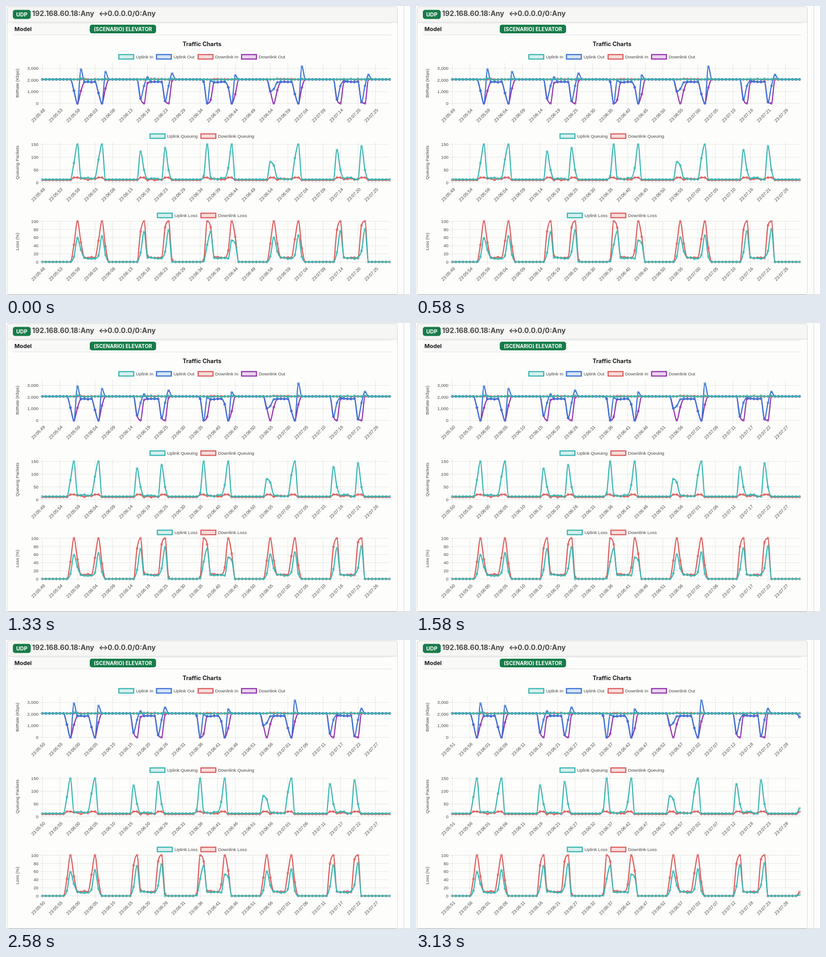
An HTML page for the animation above (3.17 s loop, 883 px wide and 634 px high).

```html
<!DOCTYPE html>
<html lang="en">
<head>
<meta charset="utf-8">
<title>Traffic Charts</title>
<style>
  html, body { margin: 0; width: 100%; height: 100%; overflow: hidden; background: #fdfdfc; }
  svg { display: block; width: 883px; height: 634px; }
  .ui { font-family: Inter, Roboto, sans-serif; font-weight: 700; }
  .chart { font: 9.75px "Liberation Sans", Arial, sans-serif; fill: #484848; }
  .grid { stroke: #000; stroke-opacity: .12; stroke-width: .82; fill: none; }
  .line { fill: none; stroke-width: 2.44; stroke-linejoin: round; }
</style>
</head>
<body>
<svg viewBox="0 0 883 634">
  <path d="M2.5 36V6.5a5 5 0 0 1 5-5H850.5a5 5 0 0 1 5 5V36Z" fill="#f6f6f4"/>
  <rect x="15" y="38" width="165" height="24.5" fill="#f9f9f8"/>
  <g fill="none" stroke="#d5d5d6">
    <rect x="2.5" y="1.5" width="853" height="631" rx="5"/>
    <path d="M3 35.5H855M869.5 0V634"/>
    <path d="M15 63.5H842M15 37.5H842" stroke="#dedee0"/>
    <path d="M0 633.5H883" stroke="#c4c4c4"/>
  </g>
  <g class="ui">
    <rect x="15" y="8.5" width="39" height="20" rx="5" fill="#177c49"/>
    <text x="34.5" y="22.8" font-size="11.6" fill="#fff" text-anchor="middle">UDP</text>
    <g font-size="15.3" fill="#484848">
      <text x="57" y="22">192.168.60.18:Any</text>
      <text x="202.5" y="22">↔</text>
      <text x="222" y="22">0.0.0.0/0:Any</text>
    </g>
    <text x="18.5" y="54.5" font-size="12.4" fill="#1d1d1f">Model</text>
    <rect x="183" y="41" width="145" height="19" rx="5" fill="#177c49"/>
    <text x="255.5" y="54.6" font-size="11.2" fill="#fff" text-anchor="middle">(SCENARIO) ELEVATOR</text>
    <text x="428.5" y="88.4" font-size="12.6" fill="#1d1d1f" text-anchor="middle">Traffic Charts</text>
  </g>
  <g class="chart" id="frame"></g>
  <g class="chart" id="plots"></g>
</svg>
<script>
const LOOP = 3170, SHIFTS = [580, 1580, 2630];
const COUNT = 100, LEFT = 79.5, RIGHT = 838.3, STEP = (RIGHT - LEFT) / (COUNT - 1);
const TEAL = "#37b6b1", BLUE = "#3872d4", RED = "#db5c5b", PURPLE = "#942fae";
const RATE = 2060;

// Each closing door cuts the uplink between two moments (in seconds) and then
// releases a burst. Doors alternate: entering the elevator, leaving it.
const DOORS = [
  { from: 9.53, to: 11, burst: 1070 }, { from: 16.43, to: 18, burst: 640 },
  { from: 28.2, to: 29.27, burst: 380 }, { from: 35.1, to: 36.27, burst: 500 },
  { from: 46.9, to: 48, burst: 100 }, { from: 53.67, to: 55, burst: 340 },
  { from: 65.5, to: 66.4, burst: 0 }, { from: 72.39, to: 74, burst: 1100 },
  { from: 84.16, to: 85.27, burst: 100 }, { from: 91.05, to: 92.27, burst: 390 },
  { from: 102.85, to: 104, burst: 0 },
];

const clamp = v => Math.max(0, Math.min(1, v));

// Share of second i that lies inside a span.
const overlap = (i, from, to) => clamp(Math.min(i + 1, to) - Math.max(i, from));

// Repeatable noise from -1 to 1.
function noise(i, seed) {
  const v = Math.sin(i * 12.9898 + seed * 78.233) * 43758.5453;
  return 2 * (v - Math.floor(v)) - 1;
}

const isRiding = i => DOORS.some((entry, n) => n % 2 === 0 &&
  i >= Math.floor(entry.from) + 2 && i < Math.floor(DOORS[n + 1]?.from));

function measure(i) {
  const riding = isRiding(i) ? 1 : 0;
  const wobble = (seed, size) => riding * size * noise(i, seed);
  const weak = riding * .105 + wobble(1, .02);
  const door = DOORS.find(d => i >= Math.floor(d.from) && i < Math.floor(d.from) + 3);
  let upCut = 0, downCut = 0, burst = 0, downQueue = riding * 3 + wobble(2, 4);
  let upLoss = riding * .095 + wobble(3, .02), downLoss = weak;
  if (door) {
    const phase = i - Math.floor(door.from);
    const share = .95 - door.from % 1;
    upCut = overlap(i, door.from, door.to);
    downCut = overlap(i, door.from, door.from + 1.95);
    downLoss = Math.max(weak, overlap(i, door.from + .05, door.from + 1.95));
    upLoss = Math.max(upLoss, [.3 * share, .4 + .45 * share, .8 - 1.2 * share][phase]);
    if (phase === 2) burst = door.burst;
    else downQueue = 10;
  }
  return {
    upIn: RATE + wobble(4, 60) + (burst > 300 ? 60 : 0),
    downIn: RATE + wobble(5, 45),
    upOut: RATE * (1 - Math.max(upCut, weak)) + burst,
    downOut: RATE * (1 - Math.max(downCut, weak)),
    upQueue: 12.5 + 137.5 * upCut + riding * 3 + wobble(6, 5),
    downQueue: 10 + downQueue,
    upLoss: 100 * upLoss,
    downLoss: 100 * downLoss,
  };
}
const samples = Array.from({ length: COUNT + SHIFTS.length }, (_, i) => measure(i));

const charts = [
  {
    title: "BitRate (Kbps)", top: 125, base: 213.5, unit: .0255, ticks: [0, 1000, 2000, 3000],
    legendY: 111.5,
    series: [
      { name: "Uplink In", color: TEAL, at: 246.6, key: "upIn" },
      { name: "Uplink Out", color: BLUE, at: 328.9, key: "upOut" },
      { name: "Downlink In", color: RED, at: 419.9, key: "downIn" },
      { name: "Downlink Out", color: PURPLE, at: 514.9, key: "downOut" },
    ],
  },
  {
    title: "Queuing Packets", top: 299, base: 387.5, unit: .558, ticks: [0, 50, 100, 150],
    legendY: 285.5,
    series: [
      { name: "Uplink Queuing", color: TEAL, at: 314.8, key: "upQueue" },
      { name: "Downlink Queuing", color: RED, at: 426, key: "downQueue" },
    ],
  },
  {
    title: "Loss (%)", top: 472.3, base: 561.4, unit: .891, ticks: [0, 20, 40, 60, 80, 100],
    legendY: 459.5,
    series: [
      { name: "Uplink Loss", color: TEAL, at: 330.8, key: "upLoss" },
      { name: "Downlink Loss", color: RED, at: 426, key: "downLoss" },
    ],
  },
];

const xAt = i => LEFT + i * STEP;
const pad = n => String(n).padStart(2, "0");

// The clock skips a second twice.
function clock(i) {
  const s = 5 * 60 + 48 + i + (i >= 36) + (i >= 86);
  return `23:${pad(Math.floor(s / 60))}:${pad(s % 60)}`;
}

// Monotone cubic through evenly spaced points.
function curve(ys) {
  const delta = ys.slice(1).map((y, i) => y - ys[i]);
  const slope = ys.map((_, i) => {
    const a = delta[i - 1] ?? delta[i], b = delta[i] ?? delta[i - 1];
    if (a * b <= 0) return 0;
    return Math.sign(a) * Math.min(Math.abs(a + b) / 2, 3 * Math.abs(a), 3 * Math.abs(b));
  });
  let d = `M${LEFT} ${ys[0].toFixed(2)}`;
  for (let i = 1; i < ys.length; i++) {
    const p = [xAt(i - 1) + STEP / 3, ys[i - 1] + slope[i - 1] / 3,
      xAt(i) - STEP / 3, ys[i] - slope[i] / 3, xAt(i), ys[i]];
    d += "C" + p.map(v => v.toFixed(2)).join(" ");
  }
  return d;
}

function frameMarkup({ title, top, base, unit, ticks, legendY, series }) {
  let grid = "", out = "";
  for (const v of ticks) {
    const y = base - v * unit;
    grid += `M${LEFT - 6.5} ${y}H${RIGHT}`;
    out += `<text x="71" y="${y + 3.4}" text-anchor="end">${v.toLocaleString("en-US")}</text>`;
  }
  for (let i = 0; i < COUNT; i += 5) grid += `M${xAt(i)} ${top}V${base + 6.5}`;
  for (const { name, color, at } of series) {
    out += `<rect x="${at}" y="${legendY - 4.9}" width="32.5" height="9.75" fill="${color}"
      fill-opacity=".2" stroke="${color}" stroke-width="2.44"/>
      <text x="${at + 37.4}" y="${legendY + 3.4}">${name}</text>`;
  }
  const mid = (top + base) / 2;
  return `<path class="grid" d="${grid}"/>${out}
    <text transform="translate(27.5 ${mid}) rotate(-90)" text-anchor="middle">${title}</text>`;
}

function plotMarkup({ base, unit, series }, shift) {
  let out = "";
  for (let i = 0; i < COUNT; i += 5)
    out += `<text transform="translate(${xAt(i) + 6.5} ${base + 15.5}) rotate(-45)"
      text-anchor="end">${clock(i + shift)}</text>`;
  for (const { color, key } of [...series].reverse()) {
    const ys = samples.slice(shift, shift + COUNT).map(s => base - s[key] * unit);
    const dots = ys.map((y, i) =>
      `<circle cx="${xAt(i).toFixed(2)}" cy="${y.toFixed(2)}" r="2.44"/>`).join("");
    out += `<path class="line" stroke="${color}" d="${curve(ys)}"/>
      <g fill="${color}" fill-opacity=".2" stroke="${color}" stroke-width=".82">${dots}</g>`;
  }
  return out;
}

const plots = document.getElementById("plots");
document.getElementById("frame").innerHTML = charts.map(frameMarkup).join("");

let shown = -1;
function draw(time) {
  const shift = SHIFTS.filter(s => time >= s).length;
  if (shift === shown) return;
  shown = shift;
  plots.innerHTML = charts.map(c => plotMarkup(c, shift)).join("");
}
function tick() {
  draw(performance.now() % LOOP);
  requestAnimationFrame(tick);
}
tick();
</script>
</body>
</html>
```
